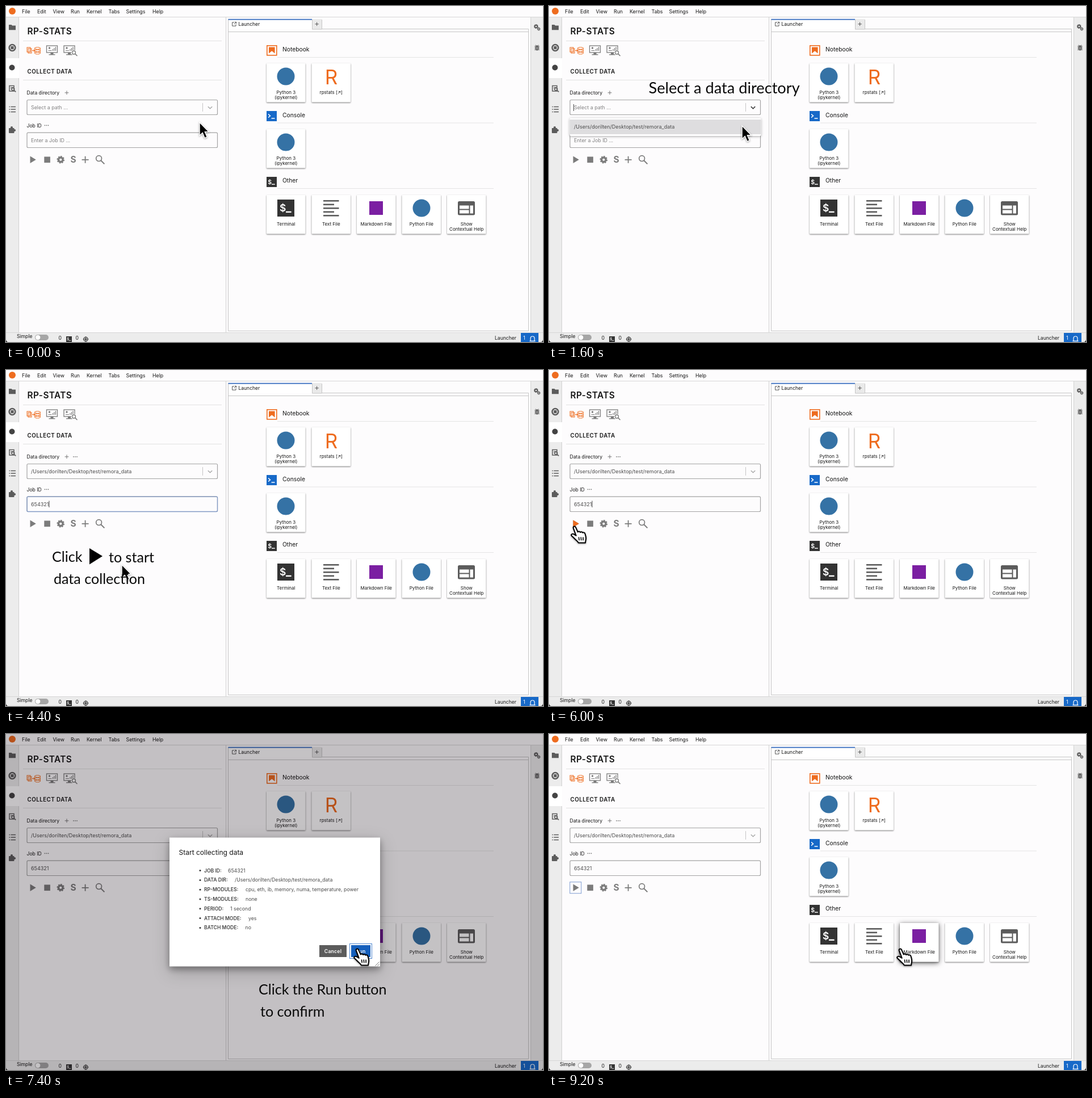
An HTML page that plays this animation: 946 px wide and 592 px high, repeating every 9.3 s.

```html
<!DOCTYPE html>
<html lang="en">
<head>
<meta charset="utf-8">
<title>Collect data</title>
<style>
  html, body { margin: 0; width: 100%; height: 100%; overflow: hidden; background: #fff; }
  svg { display: block; width: 946px; height: 592px; }
  text { font-family: Inter, sans-serif; fill: #161616; white-space: pre; }
  .mid { text-anchor: middle; }
  .bold { font-weight: 600; }
  .soft { fill: #4c4c4c; }
  .hint { fill: #808080; }
  .light { fill: #fff; }
  .mono { font-family: "DejaVu Sans Mono", monospace; }
  .cap { font-family: Lato, sans-serif; fill: #0a0a0a; }
  .card { fill: #fff; filter: drop-shadow(0 1px 1px #0008); }
  .raised { fill: #fff; filter: drop-shadow(0 2px 5px #0009); }
  .menu { fill: #fff; filter: drop-shadow(0 1px 2px #0005); }
  .dialog { fill: #fff; filter: drop-shadow(0 5px 6px #0005) drop-shadow(0 8px 14px #0003); }
  .pointer { filter: drop-shadow(0 1.5px 1.5px #0006); }
</style>
</head>
<body>
<svg id="stage" viewBox="0 0 946 592"></svg>
<script>
const PATH = '/Users/dorilten/Desktop/test/remora_data';
const JOB = '654321';
const LOOP = 9300, STEP = 100;
const ORANGE = '#ee6c1f', BLUE = '#1560bd', GREY = '#5c5c5c', TOOL = '#7c7c7c';

const text = (x, y, size, str, cls = '', more = '') =>
  `<text x="${x}" y="${y}" font-size="${size}" class="${cls}" ${more}>${str}</text>`;
const rect = (x, y, w, h, fill, more = '') =>
  `<rect x="${x}" y="${y}" width="${w}" height="${h}" fill="${fill}" ${more}/>`;
const box = (x, y, w, h, stroke, width = 1, more = '') =>
  rect(x, y, w, h, 'none', `stroke="${stroke}" stroke-width="${width}" ${more}`);
const line = (d, stroke, width = 1) =>
  `<path d="${d}" fill="none" stroke="${stroke}" stroke-width="${width}"/>`;
const shape = (d, fill, more = '') => `<path d="${d}" fill="${fill}" ${more}/>`;
const dot = (x, y, r, fill) => `<circle cx="${x}" cy="${y}" r="${r}" fill="${fill}"/>`;
const ring = (x, y, r, stroke, width, more = '') =>
  `<circle cx="${x}" cy="${y}" r="${r}" fill="none" stroke="${stroke}" stroke-width="${width}" ${more}/>`;
const part = (id, body) => `<g id="${id}">${body}</g>`;
const gear = (x, y, r, color) =>
  ring(x, y, r * .56, color, r * .5) +
  ring(x, y, r * .86, color, r * .28, 'pathLength="16" stroke-dasharray="1.1 .9"');
const lens = (x, y, r, color, width) =>
  ring(x, y, r, color, width) +
  line(`M${x + r * .7} ${y + r * .7}l${r * 1.3} ${r * 1.3}`, color, width * 1.2);
const dots = (x, y) => [-3, 0, 3].map(d => dot(x + d, y, .85, '#666')).join('');
const plus = (x, y, r, color, width) => line(`M${x - r} ${y}h${2 * r}M${x} ${y - r}v${2 * r}`, color, width);
const prompt = (x, y, s) =>
  rect(x, y, s, s, '#333') +
  text(x + s * .13, y + s * .7, s * .58, '$', 'light bold') +
  line(`M${x + s * .5} ${y + s * .73}h${s * .32}`, '#fff', s * .08);

function menuBar() {
  const items = { File: 28, Edit: 55, View: 82.5, Run: 114, Kernel: 142, Tabs: 180.5, Settings: 211.5, Help: 258 };
  return line('M0 19.5H946', '#d6d6d6') + dot(11, 9, 6, ORANGE) +
    Object.entries(items).map(([name, x]) => text(x, 13, 8.8, name)).join('');
}

function sideBars() {
  const rows = [177.5, 182, 186.5];
  return rect(0, 20, 23, 556, '#ececec') + rect(924, 20, 22, 556, '#ececec') +
    line('M22.5 20V576M924.5 20V576', '#d2d2d2') +
    rect(0, 92, 23, 35, '#fff') +
    shape('M5 33h4.6l1.4 1.5h6v7.7H5z', GREY) +
    ring(11, 73.5, 5.4, GREY, 2.5) + rect(8.4, 70.9, 5.2, 5.2, GREY) +
    dot(10.5, 108.5, 5, '#444') +
    box(6, 140.5, 8, 9.5, GREY, 1.5) + line('M8 143.5h5M8 146h2', GREY) + lens(12.4, 146.6, 2.4, GREY, 1.4) +
    rows.map(y => rect(5.5, y - .7, 1.6, 1.5, GREY) + rect(8.5, y - .7, 8.5, 1.5, GREY)).join('') +
    rect(5, 215, 9.5, 9, GREY, 'rx="1"') + dot(10, 214, 2.1, GREY) + dot(15, 219, 2.1, GREY) +
    gear(933.8, 36, 4, GREY) + gear(938.5, 40.5, 3, GREY) +
    `<ellipse cx="935.5" cy="74" rx="2.9" ry="4.4" fill="${GREY}"/>` +
    line('M931 71h9M931 74h9M931 77h9M933 68.5l1.5 2M938 68.5l-1.5 2', GREY) +
    line('M934 73h3M934 75.5h3', '#ececec', .8);
}

function panel() {
  const screen = x => box(x, 70, 19, 12, TOOL, 1.3) + rect(x + 7, 82, 5, 3, TOOL) + rect(x + 4, 85, 11, 1.4, TOOL) +
    dot(x + 5, 74, 1.7, TOOL) + line(`M${x + 3} 78.5h6M${x + 11} 79v-3M${x + 13.5} 79v-5M${x + 16} 79v-7`, TOOL, 1.2);
  const disk = y => `<ellipse cx="55.5" cy="${y}" rx="4.8" ry="1.8" fill="#fff" stroke="${ORANGE}"/>`;
  return line('M387.5 20V576', '#cfcfcf') + line('M30 61.5H380M30 130.5H380', '#e2e2e2') +
    text(37.5, 49.5, 15.4, 'RP-STATS', 'bold', 'letter-spacing=".4"') +
    box(37, 73, 6, 8, ORANGE) + box(39, 75, 6, 8, ORANGE) + line('M40.5 78h3M40.5 80.5h3', ORANGE, .8) +
    line('M46 78.5h4M48.3 76.7l2 1.8l-2 1.8', ORANGE) +
    box(50.7, 74, 9.6, 9, ORANGE) + disk(83) + disk(79) + disk(74.5) +
    screen(71.5) + screen(102) + dot(119.5, 82, 4.6, '#fff') + lens(119.5, 82, 3, TOOL, 1.3) +
    text(37.5, 118.5, 9.8, 'COLLECT DATA', 'bold', 'letter-spacing=".45"') +
    text(36.5, 156, 8.6, 'Data directory') + plus(107, 152.8, 3.4, '#777', 1) +
    part('more', dots(122, 152.8)) +
    box(37, 165.5, 335.5, 26, '#a3a3a3', 1.2, 'rx="2"') +
    line('M346.5 171V186', '#c4c4c4') +
    part('chevron', line('M355.8 177.2l3.7 3.6l3.7-3.6', '#aaa', 1.5)) +
    part('chevronOn', line('M355.8 177.2l3.7 3.6l3.7-3.6', '#444', 1.7)) +
    part('pathHint', text(44, 182, 8.9, 'Select a path ...', 'hint')) +
    part('pathValue', text(44, 182, 9, PATH, 'soft')) +
    part('pathCaret', line('M43.5 173V185', '#333', .9)) +
    text(36.5, 213.5, 8.6, 'Job ID') + dots(71.5, 210.3) +
    box(37, 223.2, 335.5, 26.3, '#a3a3a3', 1.2, 'rx="2"') +
    part('jobFocus', box(37, 223.2, 335.5, 26.3, '#8098c4', 1.3, 'rx="2"')) +
    part('jobHint', text(44, 240, 8.9, 'Enter a Job ID ...', 'hint')) +
    text(44, 240, 9, '', 'soft', 'id="job"') +
    part('jobCaret', line('M0 230.5V242', '#333', .9)) +
    shape('M42.5 264.5V277L52.8 270.8z', TOOL) +
    part('playHot', shape('M42.5 264.5V277L52.8 270.8z', ORANGE)) +
    part('playFocus', box(36.8, 260.8, 20, 20, '#7d9bd0')) +
    rect(67.3, 265.5, 10.6, 10.6, TOOL) + gear(96.3, 270.8, 6.8, TOOL) +
    text(118.6, 276.4, 15.5, 'S', 'mid', `font-weight="700" style="fill:${TOOL}"`) +
    plus(139.6, 270.8, 6, TOOL, 1.8) + lens(163.6, 268.6, 4.9, TOOL, 1.7);
}

function launcher() {
  const heading = (y, name) => line(`M478 ${y + 14.5}H859`, '#e4e4e4') + text(487, y + 4, 10.3, name);
  const card = (col, y, icon, ...label) => {
    const x = 459 + col * 79.5;
    return rect(x, y, 68.5, 68.5, '#fff', 'class="card" rx="1"') + icon +
      label.map((s, i) => text(x + 34.3, y + 54 + i * 9.4, 8, s, 'mid')).join('');
  };
  const rows = [0, 1, 2, 3, 4].map(i => rect(559, 342 + i * 6.5, i % 2 ? 19 : 27.5, 2.6, GREY)).join('');
  const help = rect(796, 344, 30, 24.5, GREY, 'rx="2.5"') + rect(799, 351.5, 16.5, 6, '#fff') +
    rect(799, 359.5, 16.5, 6, '#fff') + rect(817.5, 351.5, 5.5, 14, '#fff');
  return rect(392, 23, 147, 18, '#fff') + rect(539, 23, 17, 18, '#eaeaea') +
    line('M556 40.5H920.5V572.5H391.5V23M539.5 24V41H556.5V24M391.5 45.5H920.5', '#c6c6c6') +
    rect(391.5, 22.8, 147.5, 1.8, '#3a6fc0') +
    line('M402 28.8h-3.4v6.4h6.4v-3M402.8 28.3h2.8v2.8M405.3 28.6l-3.6 3.6', '#555', 1) +
    text(409.5, 35.3, 8.5, 'Launcher') + plus(547.6, 31.8, 3.2, '#555', 1) +
    heading(76, 'Notebook') + box(459.8, 69.8, 17, 17, ORANGE, 1.6) +
    shape('M463 72.6h10.6v10.8l-5.3-4.2l-5.3 4.2z', ORANGE) +
    heading(191.5, 'Console') + rect(459, 185, 18, 18, '#1769c8') +
    line('M462 190.5l3.4 3l-3.4 3M467.5 198h6', '#fff', 1.6) +
    heading(307, 'Other') + prompt(459, 301, 18) +
    part('hover', rect(618, 333, 68.5, 68.5, '#fff', 'class="raised"')) +
    card(0, 101, dot(493, 124, 15.5, '#3572a5'), 'Python 3', '(ipykernel)') +
    card(1, 101, text(573, 137.5, 35, 'R', 'mid', `style="fill:${ORANGE}"`), 'rpstats [↗]') +
    card(0, 217, dot(493, 240, 15.5, '#3572a5'), 'Python 3', '(ipykernel)') +
    card(0, 333, prompt(478, 341, 30), 'Terminal') +
    card(1, 333, rows, 'Text File') +
    card(2, 333, rect(640, 344, 24, 24, '#7b1fa2'), 'Markdown File') +
    card(3, 333, dot(732, 356, 15.5, '#3572a5'), 'Python File') +
    card(4, 333, help, 'Show', 'Contextual Help');
}

function statusBar() {
  return rect(0, 576, 946, 16, '#ececec') + line('M0 575.5H946', '#d6d6d6') +
    text(19, 585, 8.6, 'Simple') + rect(51, 579, 24, 10, '#a6a6a6', 'rx="5"') + dot(56.2, 584, 4.2, '#fff') +
    text(92.5, 588.3, 8.6, '0') + prompt(106, 582, 10) + text(122.5, 588.3, 8.6, '0') +
    ring(140.5, 587, 3.6, '#444', 1.4) + plus(140.5, 587, 5, '#444', .8) + rect(139, 585.5, 3, 3, '#444') +
    text(861, 588.3, 8.6, 'Launcher') + rect(907, 576, 31, 16, '#1769c8') +
    text(911, 588.3, 9, '1', 'light') +
    line('M922.5 590.3h10M924 590v-4.5a3.5 3.5 0 0 1 7 0v4.5', '#fff', 1.2) +
    shape('M0 588v4h4q-3 0-4-4zM946 588v4h-4q3 0 4-4z', '#222');
}

const grip = (x, y) => line(`M${x - 7} ${y}l7-7M${x - 3} ${y}l3-3`, '#555', .8);

function button(x, y, w, h, label, focus) {
  return rect(x, y, w, h, focus ? BLUE : GREY) +
    (focus ? box(x - 2.5, y - 2.5, w + 5, h + 5, '#4e86cf') : '') +
    text(x + w / 2, y + h / 2 + 3.1, 8.7, label, 'light bold mid', 'letter-spacing=".2"');
}

function confirmDialog() {
  const facts = [
    ['JOB ID', 391, JOB], ['DATA DIR', 403, PATH],
    ['RP-MODULES', 422, 'cpu, eth, ib, memory, numa, temperature, power'],
    ['TS-MODULES', 422, 'none'], ['PERIOD', 395, '1 second'],
    ['ATTACH MODE', 427, 'yes'], ['BATCH MODE', 421.5, 'no']
  ];
  return rect(288, 182.5, 371, 227, '#fff', 'class="dialog"') +
    text(304.5, 213, 12, 'Start collecting data') +
    facts.map(([name, x, value], i) => {
      const y = 243.6 + i * 16.8;
      return dot(342, y - 3, 1.5, '#333') + text(349, y, 8.6, name + ':', 'bold', 'style="fill:#444"') +
        text(x, y, 8.75, value, 'soft');
    }).join('') +
    button(552, 372, 48, 21, 'Cancel') + button(608, 372, 34, 21, 'Run', true) + grip(657.5, 408.5);
}

function doneDialog() {
  return rect(363, 237, 221, 118.5, '#fff', 'class="dialog"') +
    text(379, 267, 12.2, 'RP-STATS') + text(396.5, 294, 9.65, `Starting RP for job ${JOB}`, 'mono') +
    button(537, 317, 30, 22, 'OK', true) + grip(582.5, 354);
}

const arrow = shape('M0 0V23.2L5.2 18.4L9 27.6L13.2 25.8L9.4 16.8H16.4z', '#000',
  'stroke="#fff" stroke-width="1.4"');
const hand = '<g transform="scale(1.06)">' +
  shape('M-2 .5C-2.8-2 .6-3.4 1.8-1L5.4 7C6.5 5.6 9 5.8 9.4 7.6C10.8 6.2 13 6.6 13.4 8.2' +
    'C15.4 7.2 17.2 8.4 17.6 10.4L18.8 15C19.8 19 18 21 18 25H6.5C5.5 22 2 20.5-1.5 16.5L-5 13.2' +
    'C-6.4 11-3.6 9.4-1.4 10.6L2.6 13z', '#fff', 'stroke="#000" stroke-width="1.9" stroke-linejoin="round"') +
  line('M7 15.5l.8 5.5M10.6 15.5l.5 5.5M14.2 15.5l.1 5.5', '#000', 1.5) + '</g>';

const stage = document.getElementById('stage');
stage.innerHTML =
  rect(0, 0, 946, 592, '#fdfcfd') + menuBar() + sideBars() + panel() + launcher() + statusBar() +
  part('menu', rect(36.5, 197.5, 337, 31.5, '#fff', 'class="menu" rx="2"') +
    rect(36.5, 200, 337, 26, '#fff') + part('option', rect(36.5, 200, 337, 26, '#dedddf')) +
    text(44, 216, 9, PATH, 'soft')) +
  part('dim', rect(0, 0, 946, 592, '#0a000a', 'opacity=".24"')) +
  part('confirm', confirmDialog()) + part('done', doneDialog()) +
  `<g id="pointer" class="pointer">${part('arrow', arrow)}${part('hand', hand)}</g>` +
  part('capSelect', text(175.5, 153.7, 27.2, 'Select a data directory', 'cap')) +
  part('capStart', text(81, 338, 25.1, 'Click', 'cap') + shape('M147 314V342.5L170 328z', '#000') +
    text(181, 339, 25.1, 'to start', 'cap') + text(84, 377, 25.1, 'data collection', 'cap')) +
  part('capRun', text(445, 459, 25.1, 'Click the Run button', 'cap') + text(448, 498, 25.1, 'to confirm', 'cap'));

const el = id => document.getElementById(id);

// When each part is visible, in ms
const spans = {
  capSelect: [[300, 2100]], capStart: [[4000, 5600]], capRun: [[6700, 8100]],
  menu: [[900, 1900]], option: [[1200, 1900]], pathCaret: [[900, 1900]],
  chevronOn: [[900, 1900]], chevron: [[0, 900], [1900, LOOP]],
  pathHint: [[0, 1900]], pathValue: [[1900, LOOP]], more: [[1900, LOOP]],
  jobFocus: [[2700, 5900]], jobCaret: [[2700, 6200]], jobHint: [[0, 3000]],
  playHot: [[5600, 6300]], playFocus: [[8900, LOOP]], hover: [[8900, LOOP]],
  dim: [[6300, 8900]], confirm: [[6300, 8100]], done: [[8100, 8900]],
  hand: [[5600, 6300], [7200, 8100], [8900, LOOP]],
  arrow: [[0, 5600], [6300, 7200], [8100, 8900]]
};
const parts = Object.entries(spans).map(([id, list]) => [el(id), list]);

// Pointer stops: time, x, y
const stops = [
  [0, 341, 205], [200, 341, 205], [800, 359, 177], [1000, 359, 177], [1500, 340, 211], [1900, 340, 211],
  [2500, 204, 235], [3800, 204, 235], [4300, 204, 343], [4800, 204, 343], [5600, 45, 278], [6300, 45, 278],
  [7200, 619, 381], [LOOP, 619, 381]
];

function pointerAt(t) {
  const i = stops.findIndex(s => s[0] > t);
  const [t0, x0, y0] = stops[i - 1], [t1, x1, y1] = stops[i];
  const u = (t - t0) / (t1 - t0), k = u * u * (3 - 2 * u);
  return [x0 + (x1 - x0) * k, y0 + (y1 - y0) * k];
}

const job = el('job');

function draw(t) {
  for (const [node, list] of parts)
    node.style.display = list.some(([from, to]) => t >= from && t < to) ? '' : 'none';
  const typed = Math.max(0, Math.min(JOB.length, Math.floor((t - 2850) / 150)));
  job.textContent = JOB.slice(0, typed);
  const end = 44.5 + (typed ? job.getComputedTextLength() : 0);
  el('jobCaret').setAttribute('transform', `translate(${end})`);
  el('pointer').setAttribute('transform', `translate(${pointerAt(t)})`);
  el('arrow').setAttribute('transform', t > 8000 ? 'translate(2 -4)' : '');
}

const start = performance.now();
let shown = -1;
function tick() {
  const t = Math.floor((performance.now() - start) % LOOP / STEP) * STEP;
  if (t !== shown) draw(shown = t);
  requestAnimationFrame(tick);
}
tick();
</script>
</body>
</html>
```
